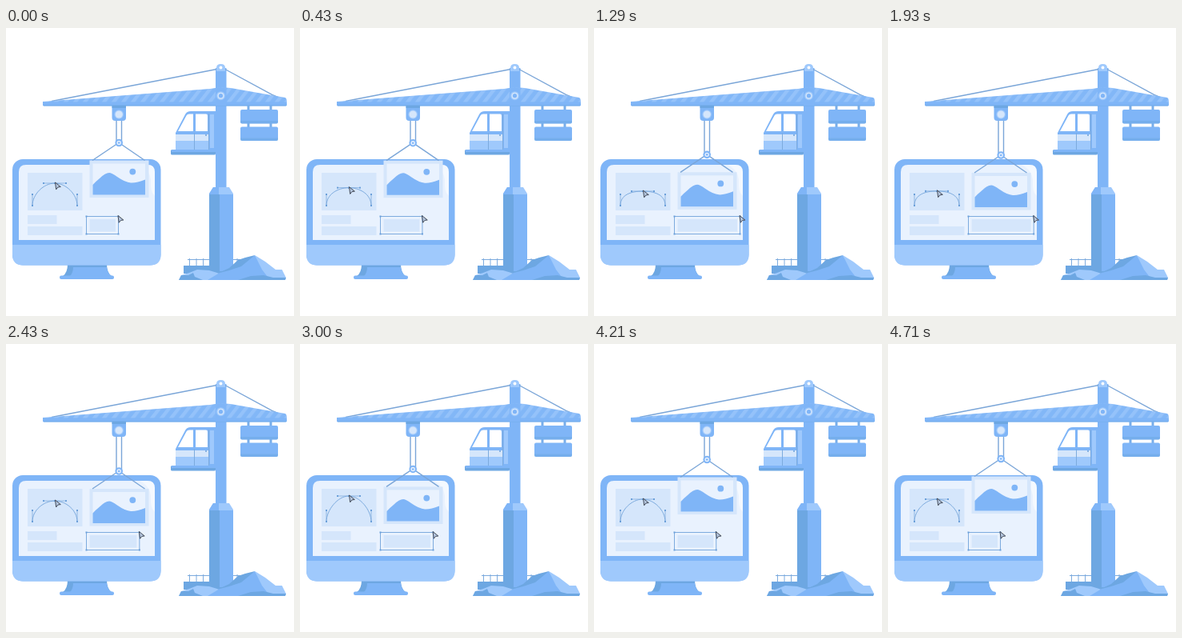
An HTML page for the animation above (5 s loop, 360 px wide and 360 px high).

```html
<!DOCTYPE html>
<html lang="en">
<head>
<meta charset="utf-8">
<title>Crane building a page</title>
<style>
html, body { margin: 0; width: 100%; height: 100%; overflow: hidden; background: #fff; }
svg { display: block; width: 100vw; height: 100vh; }
.a { fill: #7fb5f7; }
.b { fill: #9fc9fc; }
.c { fill: #6da7e2; }
.d { fill: #d5e6fb; }
.e { fill: #e9f2fe; }
.w { fill: #fff; }
.line { fill: none; stroke: #7dabde; stroke-width: 1; }
.rope { fill: none; stroke: #7ba6d8; stroke-width: 1.4; }
.dot { fill: #6ca0da; }
.arrow { fill: #b4c6df; stroke: #434a58; stroke-width: 1; stroke-linejoin: round; }
</style>
</head>
<body>
<svg viewBox="0 0 360 360">
  <defs>
    <pattern id="stripes" width="12" height="24" patternUnits="userSpaceOnUse" patternTransform="skewX(-38)">
      <rect width="12" height="24" fill="#82b7f7"/>
      <rect width="5.5" height="24" fill="#94c2fa"/>
    </pattern>
    <path id="arrow" class="arrow" d="M0 0L6.800 5.500L3.500 5.900L1.200 8.800Z"/>
  </defs>

  <!-- fence and ground -->
  <g class="line" id="fence"><path d="M227 289.500H300"/></g>
  <path class="c" d="M222 297H300V307H222Z"/>

  <!-- mast -->
  <path class="a" d="M262 50H275.500V202H262Z"/>
  <path class="a" d="M254 207H284V304H254Z"/>
  <path class="c" d="M254 207H267V304H254Z"/>
  <path class="b" d="M259 199H279L284 207V208H254V207Z"/>
  <path class="a" d="M259 199H266V208H254V207Z"/>

  <!-- rocks -->
  <path class="b" d="M216 315L219 309L229 306L239 302L254 303L264 306L284 315Z"/>
  <path class="c" d="M216 315L219 309L228 309L234 306L236 311L246 315Z"/>
  <path class="c" d="M266 306L279 300L290 290L299 287L311 284L304 296L284 307Z"/>
  <path class="a" d="M252 315L267 306L279 303L294 298L311 284L322 300L332 315Z"/>
  <path class="b" d="M311 284L324 292L337 302L345 302L350 312L349 315H330L320 302Z"/>
  <path class="c" d="M290 315L306 310L322 309L334 312L350 312L349 315Z"/>

  <!-- cab -->
  <path class="a" d="M212 131L224 108Q226 104 231 104H262V153H212Z"/>
  <path class="w" d="M215 129L225.500 109.500Q226.500 107.500 229 107.500H234V129Z"/>
  <path class="w" d="M237 107.500H250Q252 107.500 252 109.500V129H237Z"/>
  <path class="b" d="M255 108H260V150H255Z"/>
  <path class="d" d="M212 133H253V141H212Z"/>
  <path class="b" d="M212 141H253V152H212Z"/>
  <path class="line" d="M253.500 107V152M235.500 131V152"/>
  <circle class="dot" cx="250" cy="134" r="1"/>
  <rect class="c" x="206" y="152" width="56" height="6.500" rx="1.500"/>
  <path class="a" d="M207 152H262V155H207Z"/>

  <!-- counterweights -->
  <path d="M303 96V126M331 96V126" stroke="#78aeea" stroke-width="3"/>
  <g id="weights"></g>

  <!-- jib -->
  <path class="rope" d="M57 91.500L266 51M271 50L334 84L343 88"/>
  <path d="M46 92L255 76L268 74L281 75L349 87Q351 88 351 92V97H46Z" fill="url(#stripes)"/>
  <rect class="a" x="46" y="92.500" width="305" height="5" rx="1.500"/>
  <path class="c" d="M47 96.300H350V97.600H47Z" opacity=".6"/>
  <path class="a" d="M262 78Q268 70 275.500 78V97H262Z"/>
  <circle class="b" cx="268.500" cy="84.700" r="5.500"/>
  <circle class="d" cx="268.500" cy="84.700" r="4"/>
  <circle class="a" cx="268.500" cy="84.700" r="2.600"/>
  <path class="b" d="M263 54V50Q263 45 268.500 45T274 50V54Z"/>
  <circle class="w" cx="268.500" cy="49.500" r="1.900"/>

  <!-- monitor -->
  <path class="c" d="M77 295H126Q126 306 132 310H71Q77 306 77 295Z"/>
  <path class="a" d="M84 299H126Q127 307 132 310H80Q84 306 84 299Z"/>
  <rect class="a" x="67" y="309.500" width="68" height="4.500" rx="2"/>
  <rect class="a" x="8" y="164" width="185.500" height="132.500" rx="13"/>
  <path class="b" d="M8 271H193.500V283.500Q193.500 296.500 180.500 296.500H21Q8 296.500 8 283.500Z"/>
  <path class="e" d="M16 265V180Q16 171 25 171H177Q186 171 186 180V265Z"/>
  <path class="w" d="M167 171H177Q186 171 186 180V210Q180 205 181 192Q181 178 167 171Z" opacity=".5"/>
  <path class="d" d="M27 181H95.500V228H27ZM27 234H63.500V245H27ZM27 248H95.500V259H27Z"/>

  <!-- curve editor -->
  <path id="curve" class="line"/>
  <path id="bars" class="line" stroke-opacity=".8"/>
  <g id="knots"></g>
  <use id="penArrow" href="#arrow"/>

  <!-- box editor -->
  <rect id="fill" class="d" x="104.500" y="239" height="15.500"/>
  <rect id="frame" class="line" x="100.500" y="235.500" height="22"/>
  <g id="corners"></g>
  <use id="boxArrow" href="#arrow"/>

  <!-- hoist -->
  <path id="cables" class="rope"/>
  <path class="a" d="M132.500 97H150V112Q150 116 146 116H136.500Q132.500 116 132.500 112Z"/>
  <path class="c" d="M132.500 97H150V100H132.500Z"/>
  <circle class="b" cx="141.200" cy="108" r="5.800"/>
  <circle class="d" cx="141.200" cy="108" r="4.600"/>
  <g id="load">
    <rect class="d" x="104.500" y="165.500" width="74" height="46.500"/>
    <rect class="e" x="108.500" y="169.500" width="65.500" height="39"/>
    <path class="a" d="M108.500 208.500V196Q112 192 117 188Q124 181 129 181Q132 181 139 186Q149 193 156 193.500Q163 194 174 189.500V208.500Z"/>
    <circle class="a" cx="158.300" cy="179.600" r="3.900"/>
    <path class="rope" d="M108 165.500L138.500 145M143.500 145L173.500 165.500"/>
    <circle class="a" cx="141.200" cy="143.500" r="4.800"/>
    <circle class="e" cx="141.200" cy="143.500" r="2.700"/>
    <circle class="a" cx="141.200" cy="143.500" r="1.300"/>
  </g>
</svg>
<script>
const LOOP = 5000, STEP = LOOP / 70;
const $ = id => document.getElementById(id);

// [time, value] stops, eased in between
const hoist = [[350, 0], [1430, 15.5], [2430, 15.5], [4570, 0]];
const crown = [[0, 194], [790, 204], [1860, 204], [2910, 190], [3500, 190], [4210, 194]];
const edge = [[0, 140.5], [1170, 182.5], [1860, 182.5], [2700, 162], [3430, 174.5], [3500, 174.5], [4710, 140.5]];

function at(stops, t) {
  if (t <= stops[0][0]) return stops[0][1];
  for (let i = 1; i < stops.length; i++) {
    const [t0, v0] = stops[i - 1], [t1, v1] = stops[i];
    if (t < t1) return v0 + (v1 - v0) * (1 - Math.cos(Math.PI * (t - t0) / (t1 - t0))) / 2;
  }
  return stops[stops.length - 1][1];
}

const set = (id, name, value) => $(id).setAttribute(name, value);
const move = (id, x, y) => set(id, 'transform', `translate(${x} ${y})`);
const knots = points => points.map(([x, y]) =>
  `<rect class="dot" x="${x - 1}" y="${y - 1}" width="2" height="2"/>`).join('');

$('fence').innerHTML += Array.from({ length: 9 }, (_, i) =>
  `<path d="M${229.5 + i * 8.5} 288V298"/>`).join('');
$('weights').innerHTML = [102, 123.5].map(y =>
  `<rect class="a" x="293" y="${y}" width="47" height="17.500" rx="2"/>
   <path class="c" d="M293 ${y + 14}H340V${y + 15.5}Q340 ${y + 17.5} 338 ${y + 17.5}H295Q293 ${y + 17.5} 293 ${y + 15.5}Z" opacity=".5"/>`).join('');

function draw(t) {
  const drop = at(hoist, t), y = at(crown, t), x = at(edge, t);

  move('load', 0, drop);
  const end = 141 + drop;
  set('cables', 'd', `M138 115V${end}M144.500 115V${end}`);

  set('curve', 'd', `M33 222C33 208 47 ${y} 61 ${y}S89 208 89 222`);
  set('bars', 'd', `M33 222V208M89 222V208M47 ${y}H75`);
  $('knots').innerHTML = knots([[33, 222], [33, 208], [89, 222], [89, 208], [47, y], [61, y], [75, y]]);
  move('penArrow', 61.5, y - 1);

  set('fill', 'width', x - 108);
  set('frame', 'width', x - 100.5);
  $('corners').innerHTML = knots([[100.5, 235.5], [x, 235.5], [100.5, 257.5], [x, 257.5]]);
  move('boxArrow', x - 0.5, 234.5);
}

const start = performance.now();
function tick() {
  const t = (performance.now() - start) % LOOP;
  draw(Math.floor((t + 5) / STEP) * STEP % LOOP);
  requestAnimationFrame(tick);
}
draw(0);
requestAnimationFrame(tick);
</script>
</body>
</html>
```
